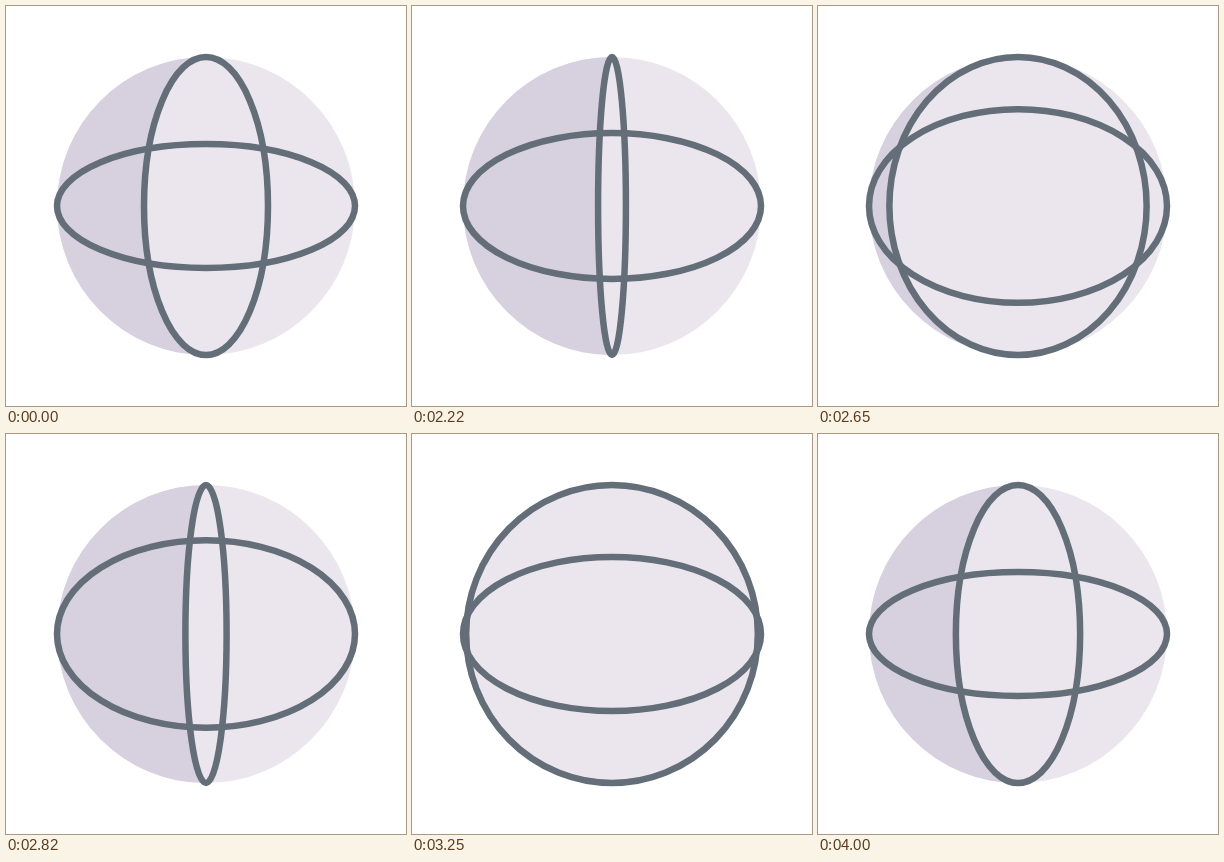
An HTML page with a canvas for the animation above (4.02 s loop, 400 px wide and 400 px high).

```html
<!DOCTYPE html>
<html lang="en">
<head>
<meta charset="utf-8">
<title>Turning globe</title>
<style>
html, body { margin: 0; width: 100%; height: 100%; overflow: hidden; background: #fff; }
canvas { display: block; width: 100vmin; height: 100vmin; }
</style>
</head>
<body>
<canvas id="stage" width="400" height="400"></canvas>
<script>
const LOOP = 4020, HOLD = 2000;
const C = 200, R = 149, REST = 62, LINE = 6.5;
const DARK = '#d7d0df', LIGHT = '#ebe6ed', INK = '#636e78';

const ctx = document.getElementById('stage').getContext('2d');

// Eased move from a to b between the times t0 and t1
function ease(t, t0, t1, a, b) {
  const s = Math.min(1, Math.max(0, (t - t0) / (t1 - t0)));
  return a + (b - a) * s * s * (3 - 2 * s);
}

// The meridian swings through both full circles; a negative width is mirrored
function meridian(t) {
  if (t < 555) return ease(t, 0, 555, REST, -R);
  if (t < 1150) return ease(t, 555, 1150, -R, R);
  return ease(t, 1150, 2020, R, REST);
}

// The equator opens, then closes more slowly
function equator(t) {
  return t < 605 ? ease(t, 0, 605, REST, 97) : ease(t, 605, 1785, 97, REST);
}

// Time moves in 25 ms steps, shown for 20 and 30 ms in turn
function step(t) {
  const pair = Math.floor(t / 50) * 50;
  return pair + (t - pair >= 20 ? 25 : 0);
}

function fillArc(color, from, to) {
  ctx.fillStyle = color;
  ctx.beginPath();
  ctx.arc(C, C, R, from, to);
  ctx.fill();
}

function ring(rx, ry, fill) {
  ctx.beginPath();
  ctx.ellipse(C, C, rx, ry, 0, 0, Math.PI * 2);
  if (fill) {
    ctx.fillStyle = fill;
    ctx.fill();
  }
  ctx.stroke();
}

function draw(time) {
  const t = Math.max(0, step(time) - HOLD);

  ctx.fillStyle = '#fff';
  ctx.fillRect(0, 0, 400, 400);
  fillArc(LIGHT, 0, Math.PI * 2);
  fillArc(DARK, Math.PI / 2, Math.PI * 1.5);

  ctx.strokeStyle = INK;
  ctx.lineWidth = LINE;
  ring(Math.abs(meridian(t)), R, LIGHT);
  ring(R, equator(t));
}

function tick() {
  draw(performance.now() % LOOP);
  requestAnimationFrame(tick);
}
tick();
</script>
</body>
</html>
```
